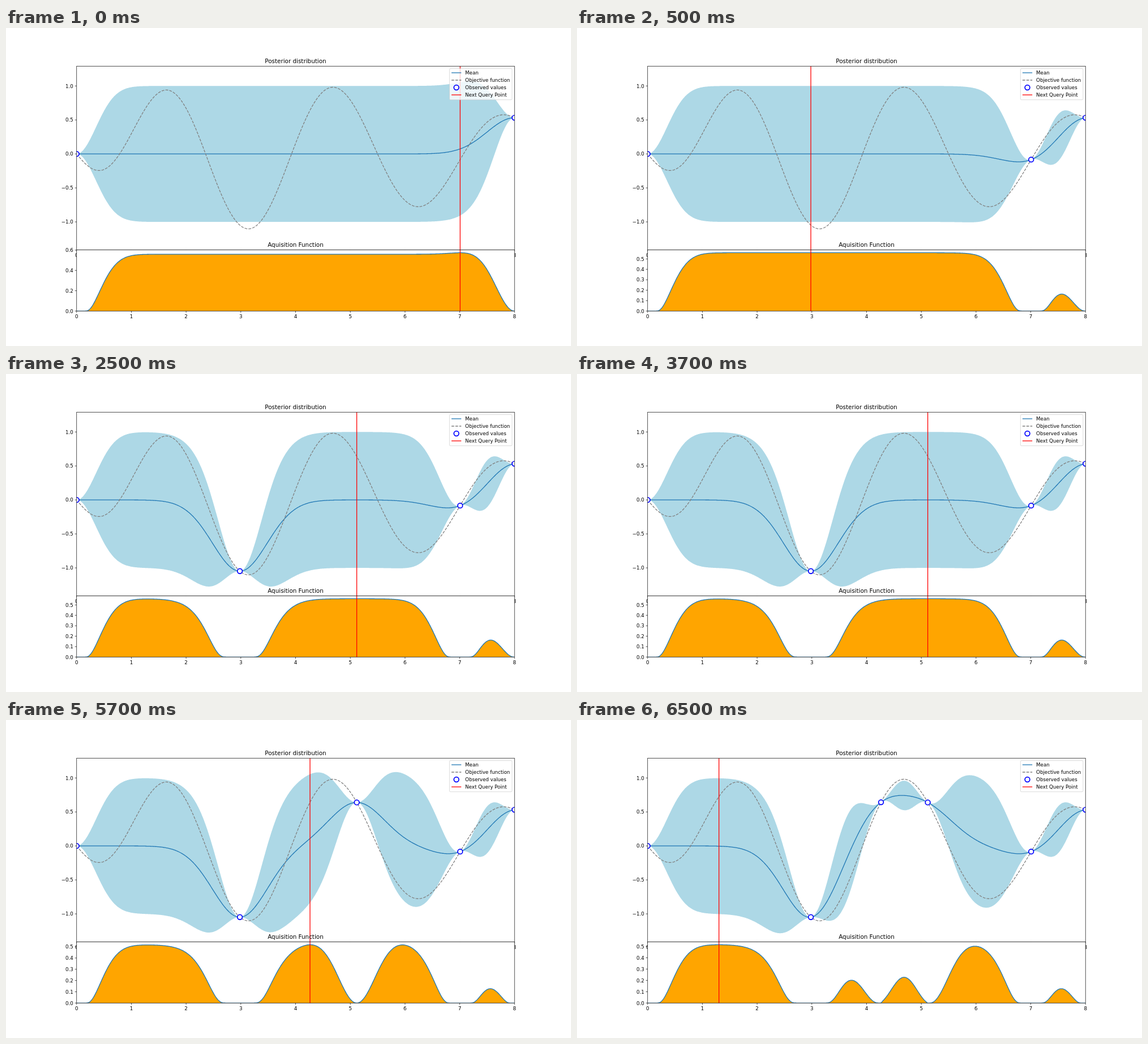
An HTML page with a canvas for the animation above (8000 ms loop, 998 by 561 pixels).

```html
<!DOCTYPE html>
<html lang="en">
<head>
<meta charset="utf-8">
<title>Bayesian optimisation</title>
<style>
html, body { margin: 0; width: 100%; height: 100%; overflow: hidden; background: #fff; }
canvas { display: block; }
</style>
</head>
<body>
<canvas id="stage" width="998" height="561"></canvas>
<script>
const ctx = document.getElementById('stage').getContext('2d');
const PT = 998 / 1152, EM = 10 * PT, LINE = 1.5 * PT;
const LEFT = 124.75, RIGHT = 898.2, TOP = 67.3, SPLIT = 391.3, BOTTOM = 499.3;
const BLUE = '#1f77b4', SAMPLES = 800;
const DASH = [3.7 * LINE, 1.6 * LINE];
const STARTS = [0, 500, 2500, 4500, 6500], LOOP = 8000;
const QUERIES = [7.007, 2.982, 5.118, 4.264, 1.303];

const xs = Array.from({ length: SAMPLES + 1 }, (_, i) => i * 8 / SAMPLES);
const px = x => LEFT + x * (RIGHT - LEFT) / 8;
const py = y => 222.15 - y * 119.9;

const objective = x => -x * Math.cos(2 * x) * Math.exp(-x / 3);
const kernel = (a, b) => Math.exp(-2 * (a - b) ** 2);
const dot = (a, b) => a.reduce((sum, v, i) => sum + v * b[i], 0);

function invert(matrix) {
  const n = matrix.length;
  const m = matrix.map((row, i) => [...row, ...row.map((_, j) => +(i === j))]);
  for (let i = 0; i < n; i++) {
    const pivot = m[i][i];
    m[i] = m[i].map(v => v / pivot);
    for (let r = 0; r < n; r++) {
      if (r === i) continue;
      const f = m[r][i];
      m[r] = m[r].map((v, c) => v - f * m[i][c]);
    }
  }
  return m.map(row => row.slice(n));
}

function normalCdf(z) {
  const a = Math.abs(z) / Math.SQRT2, t = 1 / (1 + 0.3275911 * a);
  const poly = t * (0.254829592 + t * (-0.284496736 + t * (1.421413741 + t * (-1.453152027 + t * 1.061405429))));
  const tail = poly * Math.exp(-a * a) / 2;
  return z > 0 ? 1 - tail : tail;
}

function expectedGain(mean, spread, best) {
  const gain = mean - best;
  if (spread < 1e-6) return 0;
  const z = gain / spread;
  const pdf = Math.exp(-z * z / 2) / Math.sqrt(2 * Math.PI);
  return Math.max(0, gain * normalCdf(z) + spread * pdf);
}

// Gaussian process posterior; the band is one variance wide on each side.
function fit(points) {
  const values = points.map(objective), best = Math.max(...values);
  const inverse = invert(points.map(a => points.map(b => kernel(a, b))));
  return xs.map(x => {
    const k = points.map(p => kernel(p, x));
    const weights = inverse.map(row => dot(row, k));
    const mean = dot(weights, values);
    const variance = Math.max(0, 1 - dot(weights, k));
    return { mean, variance, gain: expectedGain(mean, 2 * variance, best) };
  });
}

function text(str, x, y, align = 'center', size = EM) {
  ctx.font = `${size}px "DejaVu Sans", sans-serif`;
  ctx.textAlign = align;
  ctx.fillStyle = '#000';
  ctx.fillText(str, x, y);
}

function path(points, color, width = LINE, dash = []) {
  ctx.beginPath();
  points.forEach(([x, y]) => ctx.lineTo(x, y));
  ctx.setLineDash(dash);
  ctx.strokeStyle = color;
  ctx.lineWidth = width;
  ctx.stroke();
  ctx.setLineDash([]);
}

function fill(points, color) {
  ctx.beginPath();
  points.forEach(([x, y]) => ctx.lineTo(x, y));
  ctx.fillStyle = color;
  ctx.fill();
}

function marker(x, y) {
  ctx.beginPath();
  ctx.arc(x, y, 5 * PT, 0, 7);
  ctx.fillStyle = '#fff';
  ctx.fill();
  ctx.strokeStyle = '#00f';
  ctx.lineWidth = 2 * PT;
  ctx.stroke();
}

function axes(top, bottom, title, ticks, digitsY, draw) {
  const height = bottom - top, tick = 3.5 * PT, thin = 0.8 * PT;
  ctx.fillStyle = '#fff';
  ctx.fillRect(LEFT, top, RIGHT - LEFT, height);
  ctx.save();
  ctx.beginPath();
  ctx.rect(LEFT, top, RIGHT - LEFT, height);
  ctx.clip();
  draw();
  ctx.restore();
  for (let x = 0; x <= 8; x++) {
    path([[px(x), bottom], [px(x), bottom + tick]], '#000', thin);
    text(x, px(x), bottom + 2 * tick + 0.76 * EM);
  }
  for (const v of ticks) {
    const y = digitsY(v);
    path([[LEFT - tick, y], [LEFT, y]], '#000', thin);
    text(v.toFixed(1).replace('-', '\u2212'), LEFT - 2 * tick, y + 0.38 * EM, 'right');
  }
  ctx.strokeStyle = '#000';
  ctx.lineWidth = thin;
  ctx.strokeRect(LEFT, top, RIGHT - LEFT, height);
  text(title, (LEFT + RIGHT) / 2, top - 6 * PT, 'center', 12 * PT);
}

function legend() {
  const x = 783.4, y = TOP + EM / 2, start = x + 0.4 * EM, end = start + 2 * EM;
  ctx.beginPath();
  ctx.roundRect(x, y, RIGHT - EM / 2 - x, 55, 0.2 * EM);
  ctx.fillStyle = 'rgba(255,255,255,0.8)';
  ctx.fill();
  ctx.strokeStyle = 'rgba(204,204,204,0.8)';
  ctx.lineWidth = PT;
  ctx.stroke();
  const row = i => 79 + 13 * i;
  const line = (i, color, dash) => path([[start, row(i)], [end, row(i)]], color, LINE, dash);
  line(0, BLUE);
  line(1, '#808080', DASH);
  marker((start + end) / 2, row(2));
  line(3, '#f00');
  ['Mean', 'Objective function', 'Observed values', 'Next Query Point']
    .forEach((label, i) => text(label, end + 0.8 * EM, row(i) + 0.35 * EM, 'left'));
}

function render(step) {
  const points = [0, 8, ...QUERIES.slice(0, step)];
  const model = fit(points);
  const curve = (get, scale) => model.map((m, i) => [px(xs[i]), scale(get(m))]);
  const queryX = px(QUERIES[step]);
  const queryLine = () => path([[queryX, TOP], [queryX, BOTTOM]], '#f00');

  ctx.fillStyle = '#fff';
  ctx.fillRect(0, 0, 998, 561);

  axes(TOP, SPLIT, 'Posterior distribution', [-1, -0.5, 0, 0.5, 1], py, () => {
    const upper = curve(m => m.mean + m.variance, py);
    const lower = curve(m => m.mean - m.variance, py);
    fill([...upper, ...lower.reverse()], '#add8e6');
    path(curve(m => m.mean, py), BLUE);
    path(xs.map(x => [px(x), py(objective(x))]), '#808080', LINE, DASH);
    points.forEach(x => marker(px(x), py(objective(x))));
    queryLine();
  });
  legend();

  const limit = 1.05 * Math.max(...model.map(m => m.gain));
  const gy = v => BOTTOM - v / limit * (BOTTOM - SPLIT);
  const gap = limit > 0.6 ? 0.2 : 0.1;
  const ticks = Array.from({ length: Math.floor(limit / gap) + 1 }, (_, i) => i * gap);
  axes(SPLIT, BOTTOM, 'Aquisition Function', ticks, gy, () => {
    const gain = curve(m => m.gain, gy);
    fill([[LEFT, BOTTOM], ...gain, [RIGHT, BOTTOM]], '#ffa500');
    path(gain, BLUE);
    queryLine();
  });
}

let shown = -1;
const origin = performance.now();
function tick() {
  const t = (performance.now() - origin) % LOOP;
  const step = STARTS.filter(s => s <= t).length - 1;
  if (step !== shown) render(shown = step);
  requestAnimationFrame(tick);
}
tick();
</script>
</body>
</html>
```
